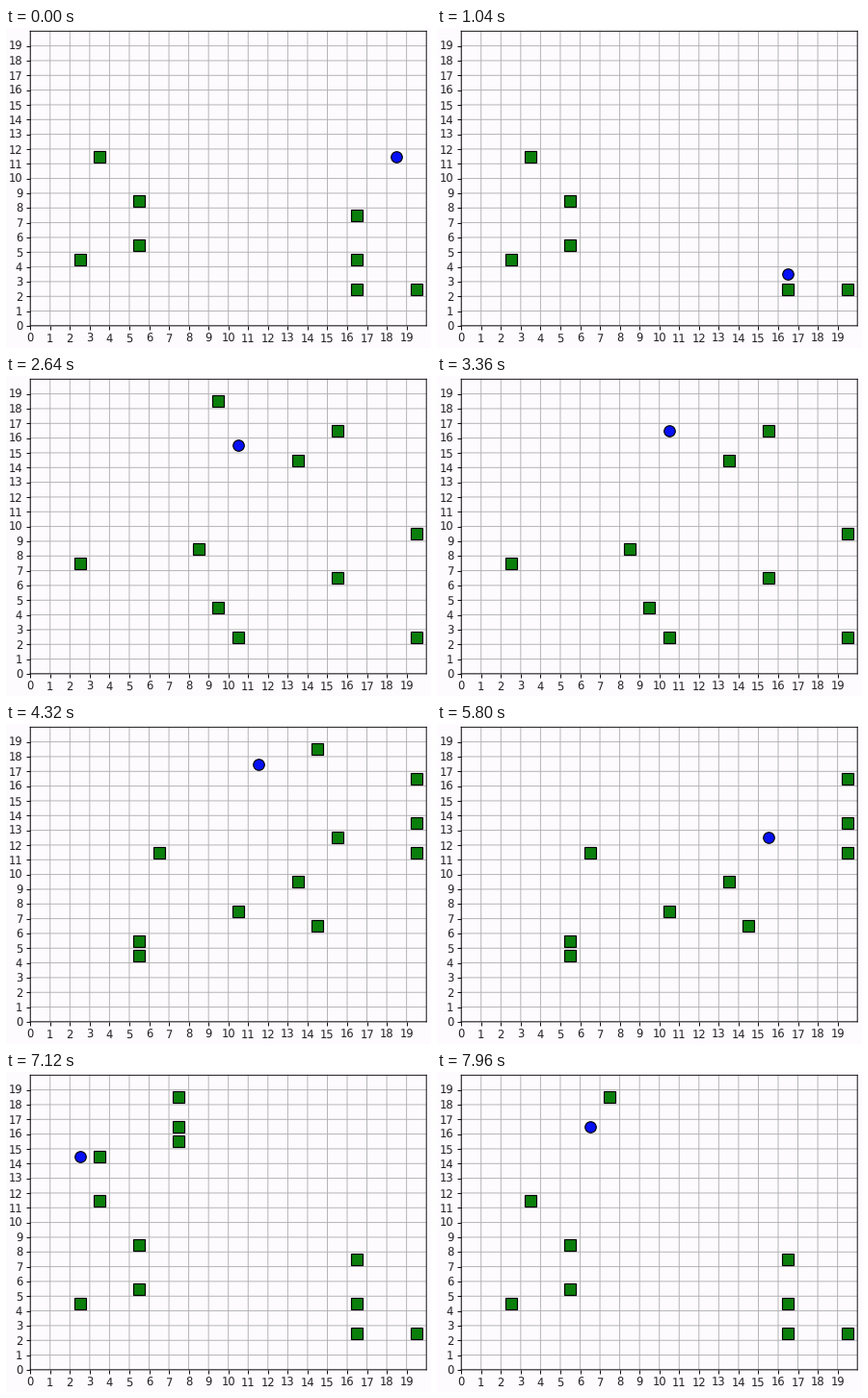
Animation, 441 px wide and 333 px high, one loop 8 s. Source, as a matplotlib script:

```python
import matplotlib.pyplot as plt
from matplotlib.animation import FuncAnimation

WIDTH, HEIGHT, DPI = 441, 333, 83
LOOP, STEP = 8000, 40
PAPER, INK = "#fefbff", "#222222"

# The first and last rounds share this field.
FIELD = [(3, 11), (5, 8), (5, 5), (2, 4), (16, 7), (16, 4), (16, 2), (19, 2)]


class Round:
    """The agent walks to each goal in turn and eats the food it steps on."""

    def __init__(self, start, pace, cell, goals, food):
        self.start, self.pace = start, pace
        self.food = food
        self.path = [cell]
        for goal in goals:
            while self.path[-1] != goal:
                self.path.append(step_toward(self.path[-1], goal))

    def at(self, t):
        moves = int((t - self.start) / self.pace)
        walked = self.path[:moves + 1]
        return [cell for cell in self.food if cell not in walked], walked[-1]


def step_toward(cell, goal):
    """Move one cell along the axis with the larger gap, rows on a tie."""
    x, y = cell
    dx, dy = goal[0] - x, goal[1] - y
    if abs(dx) > abs(dy):
        return x + (1 if dx > 0 else -1), y
    return x, y + (1 if dy > 0 else -1)


def make_rounds():
    east = [(16, 7), (16, 4), (16, 2), (19, 2)]
    north = [(10, 15), (9, 18), (13, 14), (15, 16)]
    middle = [(14, 18), (15, 12)]
    west = [(3, 14), (7, 15)]
    return [
        Round(0, 100, (18, 11), east + [(16, 2)], FIELD),
        Round(1800, 100, (3, 14), north,
              north + [(19, 9), (2, 7), (8, 8), (15, 6), (9, 4), (10, 2),
                       (19, 2)]),
        Round(4320, 125, (11, 17), middle + [(18, 12)],
              middle + [(19, 16), (19, 13), (19, 11), (6, 11), (13, 9),
                        (10, 7), (14, 6), (5, 5), (5, 4)]),
        Round(6920, 110, (1, 14), west + [(6, 16)],
              FIELD + west + [(7, 18), (7, 16)]),
    ]


ROUNDS = make_rounds()

plt.rcParams.update({"path.snap": False, "text.hinting": "none",
                     "text.color": INK, "xtick.labelcolor": INK,
                     "ytick.labelcolor": INK})
fig = plt.figure(figsize=((WIDTH + 0.001) / DPI, (HEIGHT + 0.001) / DPI),
                 dpi=DPI, facecolor=PAPER)
left, right, top, bottom = 25.2, 436.2, 3.3, 309.9
ax = fig.add_axes([left / WIDTH, 1 - bottom / HEIGHT,
                   (right - left) / WIDTH, (bottom - top) / HEIGHT],
                  facecolor=PAPER)
ax.set(xlim=(0, 20), ylim=(0, 20), xticks=range(20), yticks=range(20))
ax.grid(True)


def marks(shape, color):
    return ax.plot([], [], shape, ms=10, mfc=color, mec="black", mew=1)[0]


food_marks = marks("s", "#0b7f0b")
agent_mark = marks("o", "#0510f5")


def place(mark, cells):
    mark.set_data([x + 0.5 for x, _ in cells], [y + 0.5 for _, y in cells])


def draw(frame):
    t = frame * STEP
    current = [r for r in ROUNDS if r.start <= t][-1]
    food, agent = current.at(t)
    place(food_marks, food)
    place(agent_mark, [agent])
    return food_marks, agent_mark


anim = FuncAnimation(fig, draw, frames=LOOP // STEP, interval=STEP,
                     repeat=True, repeat_delay=0)
plt.show()
```
